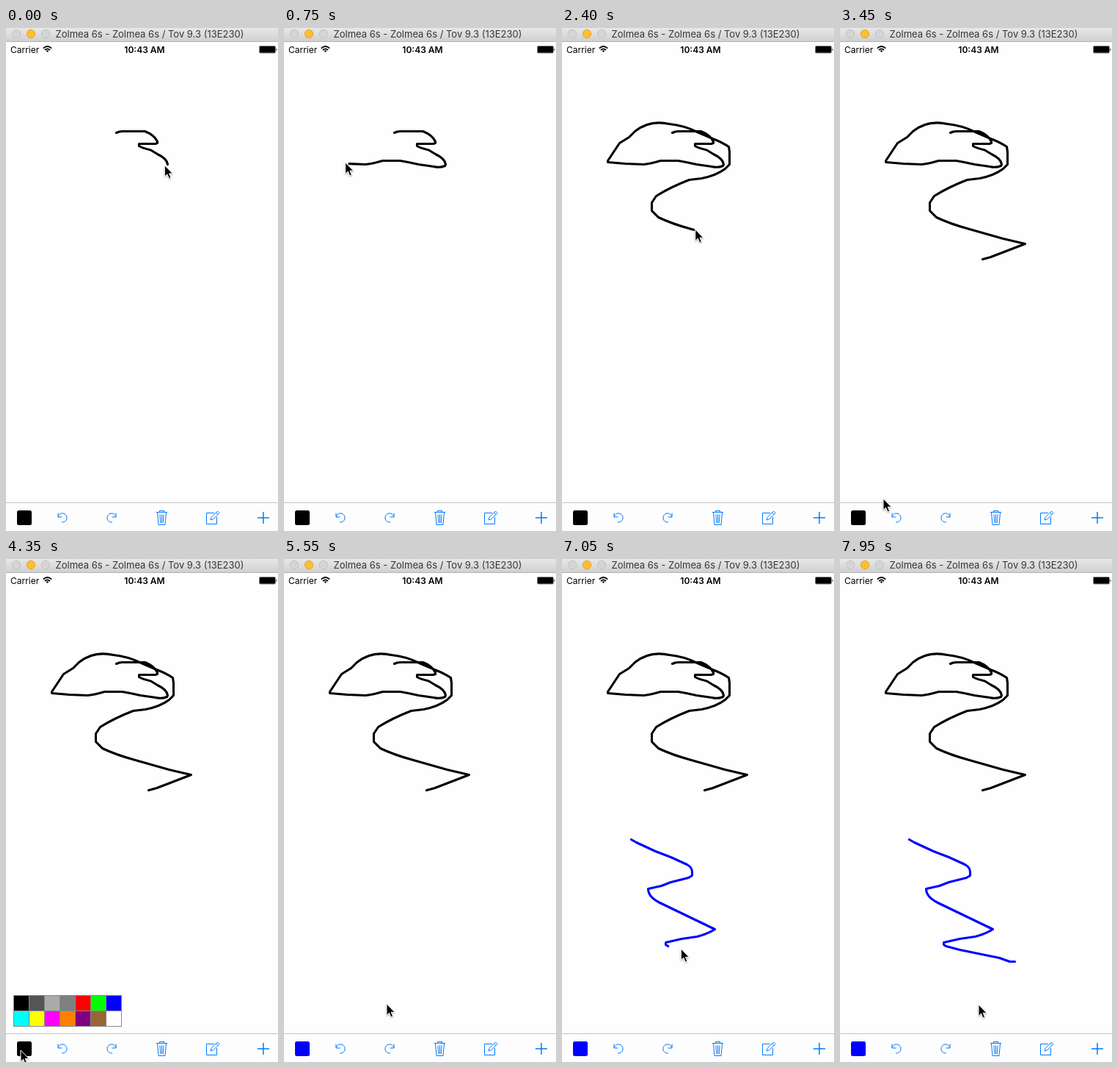
An HTML page that plays this animation: 371 by 684 pixels, repeating every 8 s.

```html
<!DOCTYPE html>
<html lang="en">
<head>
<meta charset="utf-8">
<title>Sketch pad</title>
<style>
  html, body { margin: 0; height: 100%; overflow: hidden; background: #fefefe; }
  svg { display: block; width: 371px; height: 684px; font: 12px Inter, Roboto, sans-serif; }
  .ink { fill: none; stroke-width: 3.1; stroke-linecap: round; stroke-linejoin: round; }
  .icons { fill: none; stroke: #007aff; }
</style>
</head>
<body>
<svg viewBox="0 0 371 684">
  <defs>
    <linearGradient id="bar" x2="0" y2="1">
      <stop stop-color="#e8e8e8"/><stop offset="1" stop-color="#d0d0d0"/>
    </linearGradient>
    <path id="undo" d="M71 659.5V665H76.5M71.2 665A6 6 0 1 1 76 672"/>
  </defs>
  <rect width="371" height="684" fill="#fefefe"/>

  <rect width="371" height="18" fill="url(#bar)"/>
  <path d="M0 18.5H371" stroke="#b4b4b4"/>
  <g fill="#d5d5d5" stroke="#c2c2c2">
    <circle cx="14" cy="8" r="5.7"/>
    <circle cx="34" cy="8" r="5.7" fill="#fdbe30" stroke="#e5a631"/>
    <circle cx="54" cy="8" r="5.7"/>
  </g>
  <text x="196" y="13" font-size="13" text-anchor="middle" fill="#363636">Zolmea 6s - Zolmea 6s / Tov 9.3 (13E230)</text>

  <text x="6" y="34">Carrier</text>
  <g fill="none" stroke="#000" stroke-width="1.7">
    <path d="M50.8 27.6Q56.5 22.4 62.2 27.6M53 30Q56.5 26.8 60 30"/>
    <path d="M54.6 31Q56.5 29.6 58.4 31L56.5 33Z" fill="#000" stroke="none"/>
  </g>
  <text x="189" y="34" text-anchor="middle" font-weight="600">10:43 AM</text>
  <rect x="345.5" y="24.5" width="22" height="9.5" rx="1.5" stroke="#888"/>
  <path d="M368.5 27.5Q370.5 29.3 368.5 31.2Z"/>

  <rect y="645" width="371" height="39" fill="#fdfdfd"/>
  <path d="M0 645.5H371" stroke="#c4c4c4"/>
  <rect id="swatch" x="15" y="656" width="20" height="20" rx="2.5"/>
  <g class="icons">
    <use href="#undo"/>
    <use href="#undo" transform="translate(221 0) scale(-1 1)"/>
    <path d="M205 658.5H220M209.5 658V656.5H215.5V658M206.5 659L208 675.5H217L218.5 659M210 661.5L210.7 673M212.5 661.5V673M215 661.5L214.3 673"/>
    <path d="M284 659.5H273.5V674.5H287.5V665M279 669L280 665.5L288.5 657L291 659.5L282.5 668ZM286.5 659L289 661.5"/>
    <path d="M343 666H359M351 658V674" stroke-width="1.5"/>
  </g>

  <g transform="translate(.5 .5)">
    <path id="black" class="ink" stroke="#000"/>
    <path id="blue" class="ink" stroke="#00f"/>
  </g>
  <g id="palette" stroke="#888"></g>
  <path id="cursor" d="M0 0V15.5L3.5 12.2L6 18L8.6 17L6.2 11.3H11Z" stroke="#fff" stroke-linejoin="round"
        style="filter:drop-shadow(0 1px 1px #0005)"/>
</svg>
<script>
const $ = id => document.getElementById(id);
const STEP = 150, LOOP = 8000;

// Each leg is finished at its step; the pointer runs `lead` pixels ahead of the ink.
const strokes = [
  { el: $('black'), lead: 4, legs: [
    [0, 'M150 142Q154 140 158 140H189Q202 145 206 154V156L203 157H181V160Q186 163 197 165.5L206 171Q219 177 220 185'],
    [6, 'L219 187Q212 190 204 188L183 185Q170 182 158 180H134Q121 184 111 185L86 184 62 182'],
    [9, 'V180L78 156 91 148 99 140Q119 124 146 130'],
    [15, 'Q166 132 184 141L205 150Q218 155 227 161L228 168V185L222 191Q210 200 190 204L173 206Q147 216 128 228L122 237V243'],
    [18, 'V248L131 257Q150 266 176 273L222 286 252 293 205 311 194 314']] },
  { el: $('blue'), lead: 20, legs: [
    [40, 'M94 381'],
    [47, 'L101 385 127 397 148 405 170 415Q177 419 177 425V430L172 433 148 439 135 444 117 448Q117 459 133 467L208 503' +
         'Q199 509 184 513L163 516 141 521V524L144 526'],
    [49, 'L163 531 217 542 231 547H238']] }
];
for (const s of strokes) {
  let d = '';
  s.keys = s.legs.map(([step, leg]) => {
    s.el.setAttribute('d', d += leg);
    return [step, s.el.getTotalLength()];
  });
}

// Pointer travel between strokes: step, x, y.
const travel = [
  [18, 194, 313], [19, 179, 313], [20, 179, 313], [23, 59, 640], [27, 20, 668], [29, 20, 668],
  [35, 140, 605], [37, 140, 605], [40, 94, 381], [49, 235, 548], [50, 221, 549], [51, 221, 549], [53, 189, 606]
];
const easeOut = u => u * (2 - u);

function at(keys, n, ease = u => u) {
  const i = keys.findIndex(k => k[0] >= n);
  if (i < 1) return keys.at(i).slice(1);
  const [a, b] = [keys[i - 1], keys[i]];
  const u = ease((n - a[0]) / (b[0] - a[0]));
  return a.slice(1).map((v, j) => v + (b[j + 1] - v) * u);
}

const colors = '#000 #555 #aaa #808080 #f00 #0f0 #00f #0ff #ff0 #f0f #ff8000 #800080 #996633 #fff'.split(' ');
$('palette').innerHTML = colors.map((c, i) =>
  `<rect x="${10.5 + i % 7 * 21}" y="${593.5 + (i > 6) * 21}" width="21" height="21" fill="${c}"/>`).join('');

function draw(now) {
  const n = Math.floor(now % LOOP / STEP);
  let [x, y] = at(travel, n, easeOut);
  for (const { el, lead, keys } of strokes) {
    const start = keys[0][0], end = keys.at(-1)[0];
    const [len] = at(keys, n);
    el.setAttribute('stroke-dasharray', `${len} 2000`);
    el.setAttribute('visibility', n >= start ? 'visible' : 'hidden');
    if (n >= start && n < end) {
      const tip = el.getPointAtLength(len + lead);
      [x, y] = [tip.x - 1, tip.y - 1];
    }
  }
  $('cursor').setAttribute('transform', `translate(${x} ${y})`);
  $('palette').setAttribute('visibility', n >= 29 && n < 37 ? 'visible' : 'hidden');
  $('swatch').setAttribute('fill', n < 37 ? '#000' : '#00f');
  requestAnimationFrame(draw);
}
requestAnimationFrame(draw);
</script>
</body>
</html>
```
